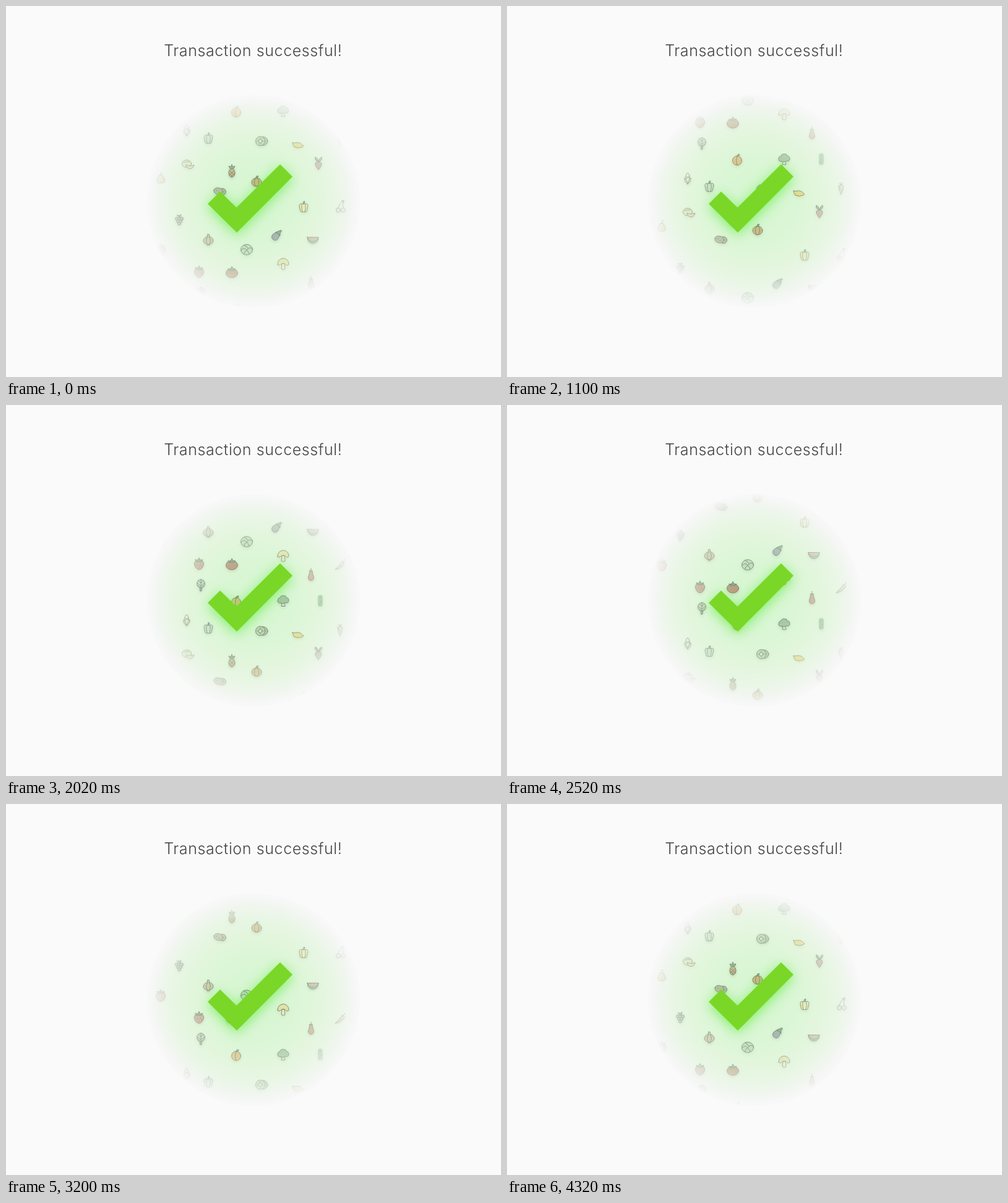
Animation, 800 px wide and 600 px high, one loop 4340 ms. Source, as an HTML page:

```html
<!DOCTYPE html>
<html lang="en">
<head>
<meta charset="utf-8">
<title>Transaction successful</title>
<style>
  html, body { margin: 0; width: 100%; height: 100%; overflow: hidden; background: #fafafa; }
  svg { display: block; width: 800px; height: 600px; }
  text { font: 300 25px Inter, "Open Sans", sans-serif; letter-spacing: .6px; fill: #444; }
  #produce { stroke: #4c5a4e; stroke-width: .9; stroke-linejoin: round; stroke-linecap: round; }
</style>
</head>
<body>
<svg viewBox="0 0 800 600">
  <defs>
    <radialGradient id="disc">
      <stop offset="0" stop-color="#d5f6d0"/>
      <stop offset=".4" stop-color="#dbf6d6"/>
      <stop offset=".62" stop-color="#e3f6dd"/>
      <stop offset=".76" stop-color="#e8f6e4"/>
      <stop offset=".88" stop-color="#f0f6ee"/>
      <stop offset=".95" stop-color="#f5f7f5"/>
      <stop offset="1" stop-color="#f8f8f8"/>
    </radialGradient>
    <radialGradient id="fade">
      <stop offset="0" stop-color="#fff" stop-opacity=".85"/>
      <stop offset=".4" stop-color="#fff" stop-opacity=".66"/>
      <stop offset=".7" stop-color="#fff" stop-opacity=".38"/>
      <stop offset=".86" stop-color="#fff" stop-opacity=".18"/>
      <stop offset="1" stop-color="#fff" stop-opacity="0"/>
    </radialGradient>
    <mask id="window" maskUnits="userSpaceOnUse" x="220" y="136" width="360" height="360">
      <circle cx="400" cy="316" r="173" fill="url(#fade)"/>
    </mask>
    <filter id="soft" filterUnits="userSpaceOnUse" x="220" y="130" width="360" height="370" color-interpolation-filters="sRGB">
      <feColorMatrix in="SourceGraphic" type="saturate" values=".7" result="muted"/>
      <feGaussianBlur in="SourceGraphic" stdDeviation="2.5"/>
      <feOffset dy="2"/>
      <feComponentTransfer result="shade"><feFuncA type="linear" slope=".35"/></feComponentTransfer>
      <feMerge><feMergeNode in="shade"/><feMergeNode in="muted"/></feMerge>
    </filter>
    <filter id="glow" filterUnits="userSpaceOnUse" x="260" y="190" width="270" height="250" color-interpolation-filters="sRGB">
      <feDropShadow dx="0" dy="4" stdDeviation="10" flood-color="#64ee44" flood-opacity=".75"/>
    </filter>
  </defs>
  <circle cx="400" cy="316" r="172" fill="url(#disc)"/>
  <g mask="url(#window)"><g id="produce" filter="url(#soft)"></g></g>
  <path d="M443 256L463 276L373 366.5L326 320L346 300L372.5 326Z" fill="#7ad728" filter="url(#glow)"/>
  <text x="399.3" y="81" text-anchor="middle">Transaction successful!</text>
</svg>
<script>
const LOOP = 4340, HOLD = 60, STEP = 20, SPEED = 0.075, PERIOD = 320, TOP = 140;

const shape = (fill, d) => `<path fill="${fill}" d="${d}"/>`;
const line = d => shape('none', d);
const oval = (fill, cx, cy, rx, ry = rx) =>
  `<ellipse fill="${fill}" cx="${cx}" cy="${cy}" rx="${rx}" ry="${ry}"/>`;
const turn = (angle, body) => `<g transform="rotate(${angle})">${body}</g>`;

const GREEN = '#86b888', LEAF = '#6b9c6b';
const bellPepper = fill =>
  shape(fill, 'M-7 -2Q-7 -6 -3 -5Q0 -6 3 -5Q7 -6 7 -2L5 7Q3 9 0 8Q-3 9 -5 7Z') +
  line('M-3 -4Q-4 2 -2 8M3 -4Q4 2 2 8') + shape(LEAF, 'M-1 -5L0 -9L2 -9L1 -5Z');
const berry = fill =>
  shape(fill, 'M0 -5Q8 -7 7.5 1Q5 9 0 9Q-5 9 -7.5 1Q-8 -7 0 -5Z') +
  shape(LEAF, 'M-6 -7L-2 -6L0 -10L2 -6L6 -7L3 -3L0 -4L-3 -3Z');

// Each item: x, y at the start of the loop, drawing centred on its own origin.
const items = [
  [372, 171, oval('#f0ac48', 0, 1, 7.5) + line('M0 -6Q-3 1 0 8') + shape(LEAF, 'M0 -6Q0 -10 4 -9Q4 -6 0 -6Z')],
  [448, 169.5, shape('#cfe0b0', 'M-2 2L-3 9H3L2 2Z') +
    shape(GREEN, 'M-4 4Q-10 4 -9 -1Q-8 -5 -5 -5Q-4 -9 1 -8Q4 -9 5 -5Q9 -5 9 0Q8 5 4 3Q0 6 -4 4Z')],
  [292, 201, oval('#f5e0a0', 0, -1, 3.2, 8) + line('M-3 -3L3 -1M-3 1L3 -4') +
    shape('#b9d0a4', 'M0 9Q-6 5 -5 -1Q-1 2 0 9Q1 2 5 -1Q6 5 0 9Z')],
  [327, 214, bellPepper('#b4dcb0')],
  [413, 218.5, oval('#9ab48a', 2, 0, 8, 7) + oval('#a9cf94', -2, 0, 7.5) +
    oval('#c9e0b4', -2, 0, 3) + line('M-2 -5V-4M-2 4V5M-7 0H-6M2 0H3')],
  [472, 225, shape('#f1ce3c', 'M-9 -4Q-6 -3 -3 -4Q4 -5 7 0L9 1L7 3Q0 6 -6 3Q-8 0 -9 -4Z')],
  [505, 255, shape('#c98a8c', 'M0 -3Q6 -3 5 2Q3 6 0 10Q-3 6 -5 2Q-6 -3 0 -3Z') +
    shape('#8a8f78', 'M0 -3Q-7 -5 -5 -11Q-1 -9 0 -3Q1 -9 5 -11Q7 -5 0 -3Z')],
  [294, 256, oval('#e2dc9c', -2, -1, 7.5, 6) + shape('#ecd08c', 'M-3 1Q4 4 10 1Q8 8 2 7Q-2 6 -3 1Z') + line('M-7 -3Q-3 -5 2 -4')],
  [365, 268, oval('#c8a04c', 0, 2, 5, 7) + line('M-4 -2L4 6M-5 2L1 8M4 -2L-4 6M5 2L-1 8') +
    shape(LEAF, 'M-3 -5L-5 -9L-1 -8L0 -12L1 -8L5 -9L3 -5Z')],
  [405, 284, oval('#dca04c', 0, 1, 8, 7) + oval('none', 0, 1, 3.5, 7) + shape(LEAF, 'M-1 -6L0 -9L3 -9L1 -6Z')],
  [345, 299.5, oval('#a8a084', 5, 1, 5.5) + shape('#aca488', 'M-9 -2Q-7 -7 0 -5Q6 -4 5 3Q2 7 -4 5Q-10 3 -9 -2Z') +
    line('M-5 -1H-4M-1 2H0M6 1H7')],
  [250, 278, shape('#ecbd6c', 'M0 -5Q4 -5 4 -1Q8 2 6 6Q3 9 0 8Q-3 9 -6 6Q-8 2 -4 -1Q-4 -5 0 -5Z') + line('M0 -5L1 -9L3 -9')],
  [481, 325, bellPepper('#f0e688')],
  [541, 324, oval('#e4cfc8', -4, 6, 3.5) + oval('#e4cfc8', 4, 6, 3.5) +
    line('M-4 3Q-2 -6 5 -10Q2 -3 4 3') + shape(LEAF, 'M5 -10L1 -9L4 -6Z')],
  [280, 347, [[-4, -3], [0, -3], [4, -3], [-2, 1], [2, 1], [0, 5]].map(([x, y]) => oval('#a2aaa0', x, y, 2.6)).join('') +
    shape(LEAF, 'M0 -5L-4 -9L0 -8L3 -10L2 -6Z')],
  [327, 379, shape('#cdb48c', 'M-2 -6Q-8 -4 -8 1Q-7 6 0 7Q7 6 8 1Q8 -4 2 -6L1 -10H-1Z') +
    line('M-1 -6Q-6 1 -1 7M1 -6Q6 1 1 7M-2 9L0 7L2 9')],
  [389, 394, oval('#acd8a6', 0, 0, 9.5, 8.5) + line('M-9 1Q-4 -5 0 1Q5 -6 9 -1M0 1Q-5 4 -4 7M0 1Q4 4 4 7M-4 -7Q1 -5 2 -2')],
  [437, 371, turn(40, shape('#8a9aa4', 'M-2 -6Q3 -7 4 -2Q7 4 4 7Q0 10 -4 7Q-7 3 -4 -2Z') +
    shape(LEAF, 'M-4 -3L-2 -7L0 -11L2 -11L2 -7L5 -3L1 -4Z'))],
  [496, 378, shape('#d09a88', 'M-9 -4H9Q8 5 0 5Q-8 5 -9 -4Z') + shape(GREEN, 'M-9 -4Q-7 3 0 3Q7 3 9 -4Q8 6 0 6Q-8 6 -9 -4Z')],
  [448, 417, shape('#f0e8b8', 'M-2 0L-3 8Q0 11 3 8L2 0Z') + shape('#eadb7c', 'M-9 1Q-9 -8 0 -9Q9 -8 9 1Q6 4 3 0Q0 -2 -3 0Q-6 4 -9 1Z')],
  [312, 430, berry('#d98a78') + line('M-3 1V2M2 0V1M0 4V5M4 3V4')],
  [365, 431, oval('#c47c58', 0, 1, 9.5, 7.5) + shape(LEAF, 'M-6 -6L-2 -5L0 -10L2 -6L6 -6L3 -3L0 -4L-3 -3Z')],
  [493, 447, shape('#d98a6c', 'M-2 -6H2Q2 -1 4 3Q6 9 0 10Q-6 9 -4 3Q-2 -1 -2 -6Z') + line('M0 -6V-10')],
  [250, 394.5, berry('#e2968a')],
  [541, 431.5, turn(45, shape('#e0b0a0', 'M-2 -6H3Q5 3 -1 12Q0 3 -2 -6Z') + line('M0 -6Q0 -10 -2 -11'))],
  [540, 216, shape('#e6c0a8', 'M-4 -3Q0 -6 4 -3Q3 4 0 11Q-3 4 -4 -3Z') + line('M-3 0H0M0 4H2M-3 -8L0 -4L0 -9M0 -4L3 -8')],
  [508, 169.5, `<rect x="-3.5" y="-9" width="7" height="18" rx="3" fill="#75b878" stroke="#80b884"/>` + line('M0 -5V-4M1 1V2M-1 5V6')],
  [315, 464, oval('#b4ccac', 0, -2, 6.5, 7) + line('M-6 -3L0 2L6 -3M-4 -7L0 -3L4 -7M0 -9V4M-5 1L0 5L5 1') + shape(LEAF, 'M-1.5 5H1.5L1 10H-1Z')]
];

const produce = document.getElementById('produce');
produce.innerHTML = items.map(([, , body]) => `<g>${body}</g>`).join('');
const nodes = [...produce.children];
// The window is slightly taller than one period, so a second copy fills its lower edge.
const copies = nodes.map(node => produce.appendChild(node.cloneNode(true)));

function place(node, x, y) {
  node.setAttribute('transform', `translate(${x} ${y})`);
}

function render(time) {
  const t = Math.floor((time % LOOP) / STEP) * STEP;
  const shift = Math.max(0, t - HOLD) * SPEED;
  items.forEach(([x, y], i) => {
    const current = TOP + (y + shift - TOP + PERIOD) % PERIOD;
    place(nodes[i], x, current);
    place(copies[i], x, current + PERIOD);
  });
}

const start = performance.now();
function tick() {
  render(performance.now() - start);
  requestAnimationFrame(tick);
}
render(0);
requestAnimationFrame(tick);
</script>
</body>
</html>
```
